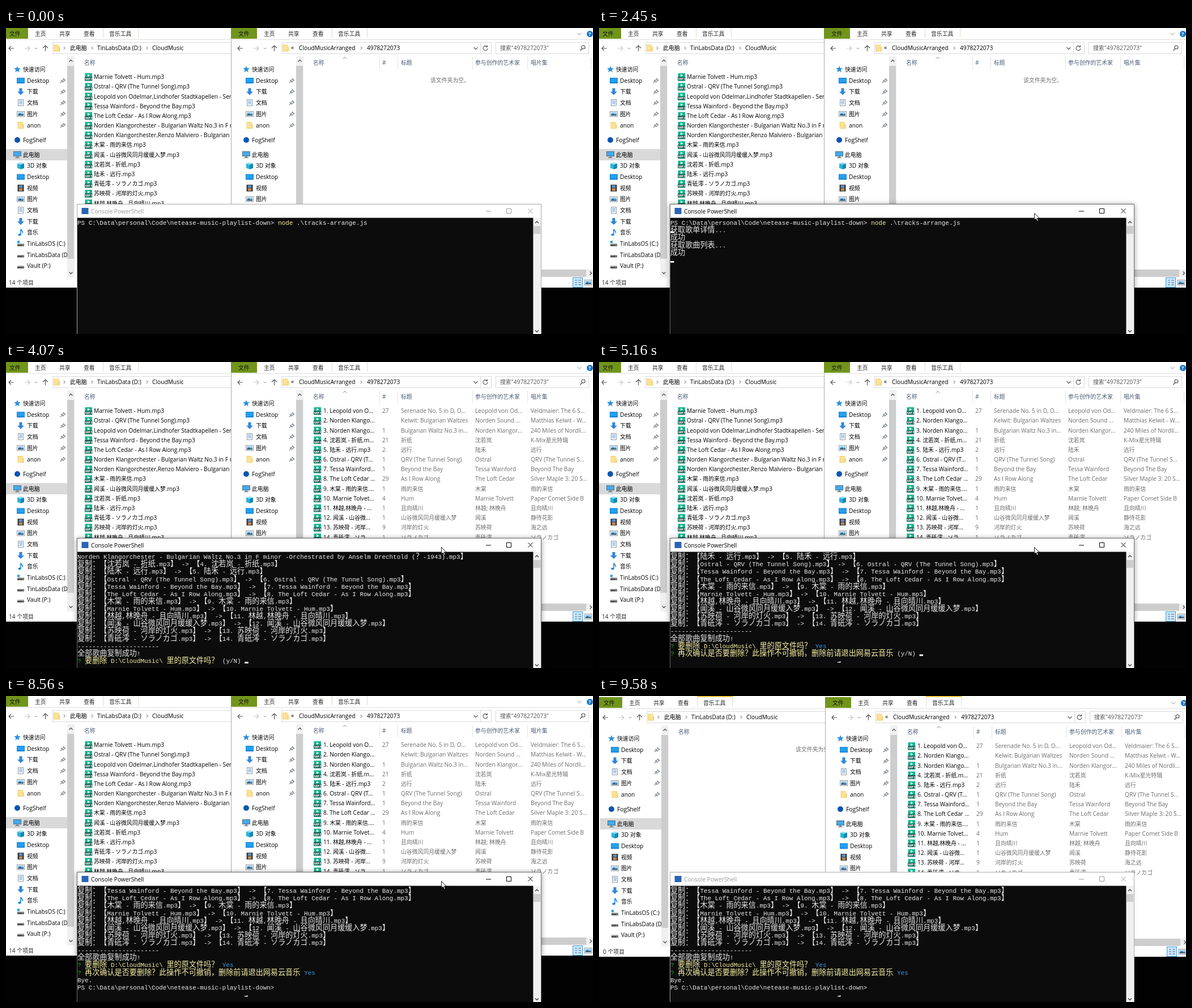
Animation of 1036x541 px, one loop 9680 ms. Source, as an HTML page:

```html
<!DOCTYPE html>
<html lang="zh-CN">
<head>
<meta charset="utf-8">
<title>Arrange tracks</title>
<style>
html, body { margin: 0; width: 100%; height: 100%; overflow: hidden; background: #000; }
svg { display: block; width: 1036px; height: 541px; text-spacing-trim: space-all; }
text { white-space: pre; font: 10.2px "Open Sans", "Noto Sans CJK SC", "Noto Sans CJK", sans-serif; }
text .cjk { font-size: 9.85px; }
.term text { font: 10.93px "Liberation Mono", "Noto Sans CJK SC", monospace; }
.term .cjk { font: 300 13.12px "Noto Sans CJK SC", "Noto Sans CJK", sans-serif; }
.nav { clip-path: polygon(0 0, 107px 0, 107px 459px, 0 459px); }
</style>
</head>
<body>
<svg id="stage" viewBox="0 0 1036 541"></svg>
<script>
const LOOP = 9680;
const stage = document.getElementById('stage');

// File name, track number, title, artists, album
const songs = [
  ['Leopold von Odelmar,Lindhofer Stadtkapellen - Serenade No. 5 in D, Op. 38 - II. Andante', 27, 'Serenade No. 5 in D, Op. 38', 'Leopold von Odelmar', 'Veldmaier: The 6 Serenades'],
  ['Norden Klangorchester,Renzo Malviero - Bulgarian Waltz No.1 in E minor', '', 'Kelwit: Bulgarian Waltzes', 'Norden Sound Orchestra', 'Matthias Kelwit - Waltzes'],
  ['Norden Klangorchester - Bulgarian Waltz No.3 in F minor -Orchestrated by Anselm Drechtold (？-1943)', 1, 'Bulgarian Waltz No.3 in F minor', 'Norden Klangorchester', '240 Miles of Nordlicht Sound'],
  ['沈若岚 - 折纸', 21, '折纸', '沈若岚', 'K-Mix星光特辑'],
  ['陆禾 - 远行', 2, '远行', '陆禾', '远行'],
  ['Ostral - QRV (The Tunnel Song)', 1, 'QRV (The Tunnel Song)', 'Ostral', 'QRV (The Tunnel Song)'],
  ['Tessa Wainford - Beyond the Bay', 1, 'Beyond the Bay', 'Tessa Wainford', 'Beyond The Bay'],
  ['The Loft Cedar - As I Row Along', 29, 'As I Row Along', 'The Loft Cedar', 'Silver Maple 3: 20 Songs'],
  ['木棠 - 雨的来信', 1, '雨的来信', '木棠', '雨的来信'],
  ['Marnie Tolvett - Hum', 4, 'Hum', 'Marnie Tolvett', 'Paper Comet Side B'],
  ['林越,林晚舟 - 且向晴川', 1, '且向晴川', '林越; 林晚舟', '且向晴川'],
  ['闻溪 - 山谷微风同月缓缓入梦', 1, '山谷微风同月缓缓入梦', '闻溪', '静待花影'],
  ['苏映荷 - 河岸的灯火', 9, '河岸的灯火', '苏映荷', '海之远'],
  ['青砥澪 - ソラノカゴ', 1, 'ソラノカゴ', '青砥澪', 'ソラノカゴ'],
];
const byName = [10, 6, 1, 7, 8, 3, 2, 9, 12, 4, 5, 14, 13, 11];

// Drawing helpers
const rect = (x, y, w, h, fill, extra = '') => `<rect x="${x}" y="${y}" width="${w}" height="${h}" fill="${fill}" ${extra}/>`;
const box = (x, y, w, h, fill, line) => rect(x + .5, y + .5, w - 1, h - 1, fill, `stroke="${line}"`);
const line = (d, color, w = 1) => `<path d="${d}" fill="none" stroke="${color}" stroke-width="${w}"/>`;
const shape = (d, fill) => `<path d="${d}" fill="${fill}"/>`;
const at = (x, y, body) => `<g transform="translate(${x} ${y})">${body}</g>`;
const during = (from, to, body) => `<g data-from="${from}" data-to="${to}">${body}</g>`;
const label = (x, y, str, fill = '#000') =>
  `<text x="${x}" y="${y + 3.7}" fill="${fill}">${String(str).replace(/[^\x00-\xff]+/g, '<tspan class="cjk">$&</tspan>')}</text>`;
const chevron = (x, y, turn, color = '#555', s = 2.5, w = 1) =>
  `<path transform="translate(${x} ${y}) rotate(${turn})" d="M${-s / 2} ${-s}L${s / 2} 0L${-s / 2} ${s}" fill="none" stroke="${color}" stroke-width="${w}"/>`;

const pen = document.createElement('canvas').getContext('2d');
pen.font = '10.2px "Open Sans", "Noto Sans CJK SC", sans-serif';
function ellipsize(str, width) {
  if (pen.measureText(str).width <= width) return str;
  while (pen.measureText(str + '...').width > width) str = str.slice(0, -1);
  return str + '...';
}

const icons = {
  star: shape('M0-6L1.6-2L6-1.8L2.6 1L3.8 5.4L0 2.8L-3.8 5.4L-2.6 1L-6-1.8L-1.6-2Z', '#2b8fe0'),
  desk: rect(-7, -5, 14, 10, '#1583d8') + rect(-6, -4, 12, 7, '#22a0f2'),
  down: shape('M-2.5-6H2.5V0H6L0 6L-6 0H-2.5Z', '#2f86dc'),
  doc: box(-5, -6, 10, 12, '#fff', '#8a98a8') + line('M-3-3H3M-3-.5H3M-3 2H3', '#4f8fce'),
  pic: box(-7, -5, 14, 10, '#fff', '#8d979f') + rect(-5, -3, 10, 6, '#8fc6ee') + shape('M-5 3V1L-1-1L2 1L5 0V3Z', '#35647f'),
  folder: shape('M-5.5-6H3L4-5V-2H5.5V6H-5.5Z', '#f3cf6b') + rect(-4.5, -5, 8, 10, '#fbe196'),
  cloud: '<circle r="5" fill="#0a55b0"/>',
  pc: box(-7, -6, 14, 9, '#45a9ea', '#56707f') + rect(-2, 3, 4, 2, '#8aa0ad') + rect(-4, 5, 8, 1, '#56707f'),
  cube: shape('M0-6L6-4V4L0 6L-6 4V-4Z', '#2bb3d9') + shape('M0-6L6-4L0-2L-6-4Z', '#96e2f2') + shape('M0-2L6-4V4L0 6Z', '#1687b4'),
  film: rect(-5.5, -6, 11, 12, '#3b3b40') + rect(-3, -5, 6, 4.5, '#5b8fc4') + rect(-3, .5, 6, 4.5, '#c08a52'),
  note: line('M0 4V-6C1-3 4-3 3.5 1', '#1b86dd', 1.6) + '<ellipse cx="-2" cy="4" rx="2.6" ry="2" fill="#1b86dd"/>',
  drive: rect(-6, 0, 12, 4.5, '#4c4c4c') + rect(-6, 0, 12, 1.5, '#b5b5b5') + rect(3, 2.5, 2, 1, '#6fe08a'),
  pin: line('M-4 4L-1 1M-3-1L1 3M-1 0L2-3M1 2L4-1M1-4L5 0', '#7d8790', 1.3),
  mp3: rect(-6, -6.5, 12.5, 13.5, '#14b38d') + shape('M-1.5-5L3-2.6L-1.5-.2Z', '#fff') + rect(-6.5, 0, 13.5, 6.5, '#15584c')
    + '<text x="-5.8" y="5.5" fill="#fff" style="font-size:6px;font-weight:700">MP3</text>',
};
icons.system = icons.drive + rect(-6, -5, 4, 4, '#1b9de2');
const icon = (name, x, y) => at(x, y, icons[name]);

const places = [
  ['star', 73, '快速访问'], ['desk', 93, 'Desktop'], ['down', 112.5, '下载'], ['doc', 132, '文档'], ['pic', 152, '图片'], ['folder', 172, 'anon'],
  ['cloud', 198, 'FogShelf'], ['pc', 224, '此电脑'], ['cube', 243.7, '3D 对象'], ['desk', 263.3, 'Desktop'], ['film', 283, '视频'],
  ['pic', 302.6, '图片'], ['doc', 322.2, '文档'], ['down', 342, '下载'], ['note', 361.5, '音乐'],
  ['system', 381.2, 'TinLabsOS (C:)'], ['drive', 401, 'TinLabsData (D:)'], ['drive', 420.6, 'Vault (P:)'],
];

// Ribbon tabs, arrows and navigation pane shared by both windows
function chrome(selected) {
  const tabs = [[51, '主页'], [94, '共享'], [137, '查看'], [182, '音乐工具']];
  const nav = places.map(([name, y, str], i) => {
    const top = 'star cloud pc'.includes(name);
    return icon(name, top ? 20 : 26, y) + label(top ? 30 : 37, y, str) + (i > 0 && i < 6 ? icon('pin', 100, y) : '');
  }).join('');
  return line('M-7 20.5H640', '#dedede') + rect(-7, 0, 46, 19, '#71951b') + label(6, 10, '文件', '#111')
    + rect(171, -2, 63, 2, '#f3c640') + line('M171.5 0V17M233.5 0V17', '#e4dccb')
    + tabs.map(([x, s]) => label(x, 10, s, '#222')).join('')
    + line('M14 36H5M9 32L5 36L9 40', '#555', 1.2) + line('M33 36H42M38 32L42 36L38 40', '#c6c6c6', 1.2)
    + chevron(53, 36, 90, '#888', 2) + line('M69.5 41V31M65 35.5L69.5 31L74 35.5', '#555', 1.2)
    + (selected ? rect(0, 214, 108, 20, '#d9d9d9') : '') + `<g class="nav">${nav}</g>`
    + rect(108, 50, 13, 391, '#f0f0f0') + rect(108, 67, 12, 341, '#cdcdcd')
    + chevron(114.5, 58, -90, '#555', 3, 1.4) + chevron(114.5, 433, 90, '#555', 3, 1.4);
}

const rowY = i => 86.5 + i * 17.18;
const grey = '#6d6d6d', head = '#4c5e78';

const leftWindow = rect(-2, -2, 400, 461, '#fff') + chrome(true)
  + box(82, 25, 330, 21, '#fff', '#d9d9d9') + icon('folder', 89.5, 35.5)
  + chevron(103, 35.5, 0) + label(113, 35, '此电脑') + chevron(152, 35.5, 0) + label(161, 35, 'TinLabsData (D:)')
  + chevron(249, 35.5, 0) + label(258, 35, 'CloudMusic') + label(138, 61.5, '名称', head)
  + during(0, 8960, byName.map((n, i) => icon('mp3', 145.5, rowY(i)) + label(155, rowY(i), songs[n - 1][0] + '.mp3')).join('')
    + label(5, 450, '14 个项目', '#222'))
  + during(8960, LOOP, label(345, 92, '该文件夹为空。', grey) + label(5, 450, '0 个项目', '#222'));

const columns = [[560, 92], [664, 25], [697, 119], [828, 87], [926, 100]];
const songRow = (song, i) => icon('mp3', 549.5, rowY(i)) + song.map((cell, c) => {
  const str = c ? String(cell) : `${i + 1}. ${cell}.mp3`;
  return label(columns[c][0], rowY(i), ellipsize(str, columns[c][1]), c ? grey : '#000');
}).join('');

const rightWindow = rect(397, -2, 641, 461, '#fff') + line('M397.5 0V459', '#a9a9a9') + at(404, 0, chrome(false))
  + box(486, 25, 371, 21, '#fff', '#d9d9d9') + icon('folder', 493.5, 35.5) + label(503, 34.5, '«') + label(517, 35, 'CloudMusicArranged')
  + chevron(627, 35.5, 0) + label(637, 35, '4978272073') + chevron(829, 36, 90, '#555', 3.5, 1.2) + line('M837.5 26V45', '#d9d9d9')
  + line('M849 33A4 4 0 1 0 850 36M849.5 30.5V33.5H846.5', '#555', 1.1)
  + box(864, 25, 165, 21, '#fff', '#d9d9d9') + label(872, 35.5, '搜索"4978272073"', '#555')
  + '<circle cx="1019" cy="34" r="3" fill="none" stroke="#555" stroke-width="1.2"/>' + line('M1017 36.5L1013.5 40', '#555', 1.4)
  + chevron(1012, 10.5, 90, '#888', 3.5) + '<circle cx="1030.5" cy="10.5" r="5.5" fill="#1677c8"/>'
  + '<text x="1028" y="14" fill="#fff" style="font-weight:700;font-size:9px">?</text>'
  + [[542, '名称'], [664, '#'], [697, '标题'], [828, '参与创作的艺术家'], [926, '唱片集']].map(([x, s]) => label(x, 61.5, s, head)).join('')
  + line('M659.5 51V73M691.5 51V73M823.5 51V73M920.5 51V73M1032.5 51V73', '#e2e2e2') + chevron(598, 53, -90, '#777', 3)
  + during(0, 4070, label(749, 92, '该文件夹为空。', grey))
  + during(4070, LOOP, songs.map(songRow).join(''))
  + rect(525, 427, 513, 13, '#f0f0f0') + rect(540, 427, 484, 13, '#cdcdcd') + chevron(1032, 433.5, 0, '#555', 3, 1.4)
  + box(1000, 441, 18, 18, '#cce8ff', '#3a9bd8') + line('M1004 446H1008M1004 450H1008M1004 454H1008M1010 446H1015M1010 450H1015M1010 454H1015', '#4b6a80')
  + at(1027.5, 450, icons.pic);

// Terminal
const CELL = 6.56, ROW = 13.12, COLS = 122;
const WHITE = '#e9e9e9', YELLOW = '#f9f1a5', GREEN = '#16b810', BLUE = '#3a96dd';
const cells = str => [...str].reduce((n, c) => n + (c > '\xff' ? 2 : 1), 0);

function termRow(parts, row) {
  let col = 0, out = '';
  for (const [color, str] of parts)
    for (const run of str.match(/[^\x00-\xff]+|[\x00-\xff]+/g)) {
      out += `<tspan x="${126 + col * CELL}" fill="${color}"${run[0] > '\xff' ? ' class="cjk"' : ''}>${run.replace(/>/g, '&gt;')}</tspan>`;
      col += cells(run);
    }
  return `<text y="${348.2 + row * ROW}">${out}</text>`;
}
const screen = (from, to, rows) => during(from, to, rows.map(termRow).join(''));
const caret = (from, to, col, row) => during(from, to, rect(126 + col * CELL, 346.3 + row * ROW, 6.5, 3, '#f2f2f2'));
const plain = str => [[WHITE, str]];

function wrap(str) {
  const rows = [''];
  for (const c of str) {
    if (cells(rows[rows.length - 1] + c) > COLS) rows.push('');
    rows[rows.length - 1] += c;
  }
  return rows.map(plain);
}

const prompt = 'PS C:\\Data\\personal\\Code\\netease-music-playlist-down> ';
const start = [
  [[WHITE, prompt], [YELLOW, 'node '], [WHITE, '.\\tracks-arrange.js']],
  ...['获取歌单详情...', '成功', '获取歌曲列表...', '成功'].map(plain),
];
const copied = n => songs.slice(0, n).flatMap(([name], i) => wrap(`复制：【${name}.mp3】 -> 【${i + 1}. ${name}.mp3】`));
const ask = (question, color, answer) => [[GREEN, '? '], [YELLOW, question + ' '], [color, answer]];
const first = '要删除 D:\\CloudMusic\\ 里的原文件吗？';
const second = '再次确认是否要删除？此操作不可撤销，删除前请退出网易云音乐';
const done = [...start, ...copied(14), plain('-'.repeat(22)), plain('全部歌曲复制成功!')];
const agreed = [...done, ask(first, BLUE, 'Yes')];
const ended = [...agreed, ask(second, BLUE, 'Yes'), plain('Bye.'), plain(prompt)];

const titleBar = (ink, edge) => box(125, 311, 820, 240, '#fff', edge) + rect(133.5, 318, 12, 11, '#2a64b4')
  + label(150, 324, 'Console PowerShell', ink)
  + line('M847 324H856M883.5 319.5H891.5V327.5H883.5ZM921.5 319.5L929.5 327.5M929.5 319.5L921.5 327.5', ink);

const terminal = during(1210, 9510, rect(125, 311, 820, 240, '#555', 'style="filter:drop-shadow(0 1px 5px rgba(0,0,0,.4))"') + titleBar('#000', '#6a6a6a'))
  + during(0, 1210, titleBar('#999', '#aaa')) + during(9510, LOOP, titleBar('#999', '#aaa'))
  + rect(930, 336, 14, 205, '#f0f0f0') + rect(931, 350, 12, 14, '#cdcdcd') + rect(126, 335.6, 804.4, 206, '#0c0c0c')
  + chevron(937, 343.5, -90, '#444', 3, 1.4) + chevron(937, 536, 90, '#444', 3, 1.4)
  + '<g class="term">'
  + screen(0, 2370, start.slice(0, 1)) + screen(2370, 2450, start.slice(0, 4)) + screen(2450, 2530, start)
  + screen(2530, 2600, [...start, ...copied(4)].slice(-15))
  + screen(2600, 2680, [...start, ...copied(9)].slice(-15))
  + screen(2680, 5160, [...done, ask(first, WHITE, '(y/N) ')].slice(-15))
  + screen(5160, 7020, [...agreed, ask(second, WHITE, '(y/N) ')].slice(-14))
  + screen(7020, 7480, [...agreed, ask(second, WHITE, '(y/N) y')].slice(-14))
  + screen(7480, LOOP, ended.slice(-14))
  + '</g>'
  + caret(1990, 2530, 0, 1) + caret(2450, 2530, 0, 5) + caret(2680, 4150, 45, 14)
  + caret(5160, 7020, 67, 13) + caret(7020, 7480, 68, 13) + caret(7480, 8410, 54, 13)
  + during(4150, LOOP, shape('M421 530H423V531.5H421ZM423.5 529.5H427V531H425.5V532H423.5Z', '#ddd'));

const pointer = during(430, 9510, '<g id="pointer"><path d="M.5.5V12.5L3.3 9.9L5.3 14.5L7.3 13.6L5.3 9.2H9Z" fill="#fff" stroke="#000" stroke-width=".9"/></g>');

stage.innerHTML = rect(0, 0, 1036, 541, '#020202') + `<g id="windows">${leftWindow}${rightWindow}</g>` + terminal + pointer;

const timed = [...stage.querySelectorAll('[data-from]')].map(el => ({ el, from: +el.dataset.from, to: +el.dataset.to }));
const windows = document.getElementById('windows');
const mouse = document.getElementById('pointer');
const began = performance.now();

function draw() {
  const t = (performance.now() - began) % LOOP;
  for (const { el, from, to } of timed) el.style.display = t >= from && t < to ? '' : 'none';
  const step = Math.max(0, Math.min(8, Math.floor((t - 430) / 78.75)));
  const left = (1 - step / 8) ** 2;
  mouse.setAttribute('transform', `translate(${768 + 175 * left} ${327 + 208 * left})`);
  windows.setAttribute('transform', t >= 9510 ? 'translate(2 2)' : '');
  requestAnimationFrame(draw);
}
draw();
</script>
</body>
</html>
```
